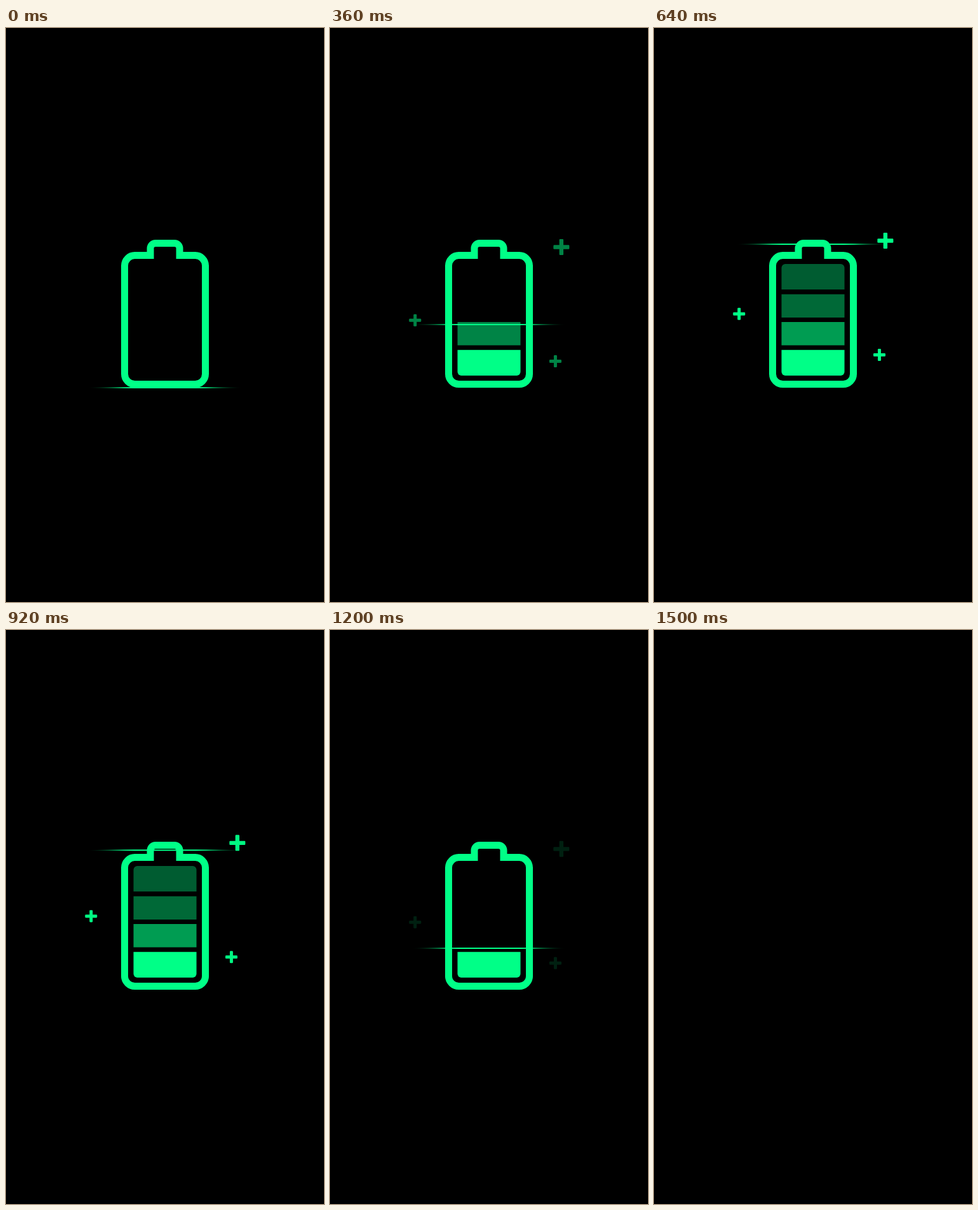
These frames come from a looping animation (500x900 px, 1.52 s). An HTML page:

```html
<!DOCTYPE html>
<html lang="en">
<head>
<meta charset="utf-8">
<title>Charging battery</title>
<style>
  html, body { margin: 0; width: 100%; height: 100%; overflow: hidden; background: #000; }
  svg { display: block; width: 100vw; height: 100vh; }
</style>
</head>
<body>
<svg viewBox="0 0 500 900" fill="#00ff87">
  <defs>
    <linearGradient id="glow">
      <stop offset="0" stop-color="#00ff87" stop-opacity="0"/>
      <stop offset=".3" stop-color="#00ff87"/>
      <stop offset=".7" stop-color="#00ff87"/>
      <stop offset="1" stop-color="#00ff87" stop-opacity="0"/>
    </linearGradient>
  </defs>
  <g id="scene">
    <path fill="none" stroke="#00ff87" stroke-width="11"
      d="M227 356.6V345.5a8 8 0 0 1 8-8H265a8 8 0 0 1 8 8V356.6H297.5a16 16 0 0 1 16 16V542.6a16 16 0 0 1-16 16H202.5a16 16 0 0 1-16-16V372.6a16 16 0 0 1 16-16Z"/>
    <g id="cells">
      <path d="M200.5 504.7h99v34.3a6 6 0 0 1-6 6h-87a6 6 0 0 1-6-6z"/>
      <path d="M200.5 461h99v36.5h-99z"/>
      <path d="M200.5 417.5h99v36.5h-99z"/>
      <path d="M200.5 410v-34a6 6 0 0 1 6-6h87a6 6 0 0 1 6 6v34z"/>
    </g>
    <g id="pluses"></g>
    <path id="beam" fill="url(#glow)" d="M128 0L185-1H315L372 0L315 1H185Z"/>
  </g>
</svg>
<script>
const LOOP = 1520, BLANK_AT = 1500;
const [scene, pluses, beam] = ["scene", "pluses", "beam"].map(id => document.getElementById(id));
const cells = [...document.getElementById("cells").children];
const cellOpacity = [1, 0.61, 0.41, 0.36];

const plus = (x, y, size, bar) => {
  const rect = (w, h) => `<rect x="${x - w / 2}" y="${y - h / 2}" width="${w}" height="${h}" rx="1.3"/>`;
  return rect(size, bar) + rect(bar, size);
};
pluses.innerHTML = plus(363.8, 333.5, 25, 6.4) + plus(133.8, 448.3, 19, 5) + plus(354.4, 512.5, 19, 5);

const ramp = (t, from, to) => Math.min(1, Math.max(0, (t - from) / (to - from)));

// Cubic ease with horizontal handles of length a (start) and b (end)
function ease(p, a, b) {
  let low = 0, high = 1;
  for (let i = 0; i < 24; i++) {
    const s = (low + high) / 2, r = 1 - s;
    if (3 * a * s * r * r + 3 * (1 - b) * s * s * r + s ** 3 < p) low = s;
    else high = s;
  }
  return low * low * (3 - 2 * low);
}

function draw(t) {
  scene.style.display = t < BLANK_AT ? "" : "none";

  const lift = ease(ramp(t, 34, 740), 0.5, 0.5) - ease(ramp(t, 776, 1503), 0.55, 0.6);
  beam.setAttribute("transform", `translate(0 ${564 - 232 * lift})`);

  cells.forEach((cell, i) => {
    const fadeIn = ramp(t, 191 + 85 * i, 291 + 85 * i);
    const fadeOut = ramp(t, 1205 - 90 * i, 1285 - 90 * i);
    cell.setAttribute("opacity", cellOpacity[i] * (fadeIn - fadeOut));
  });

  const drop = 20 * (1 - ramp(t, 160, 565) + ramp(t, 910, 1500));
  pluses.setAttribute("transform", `translate(0 ${drop})`);
  pluses.setAttribute("opacity", ramp(t, 160, 550) - ramp(t, 910, 1243));
}

const start = performance.now();
function tick() {
  draw((performance.now() - start) % LOOP);
  requestAnimationFrame(tick);
}
tick();
</script>
</body>
</html>
```
